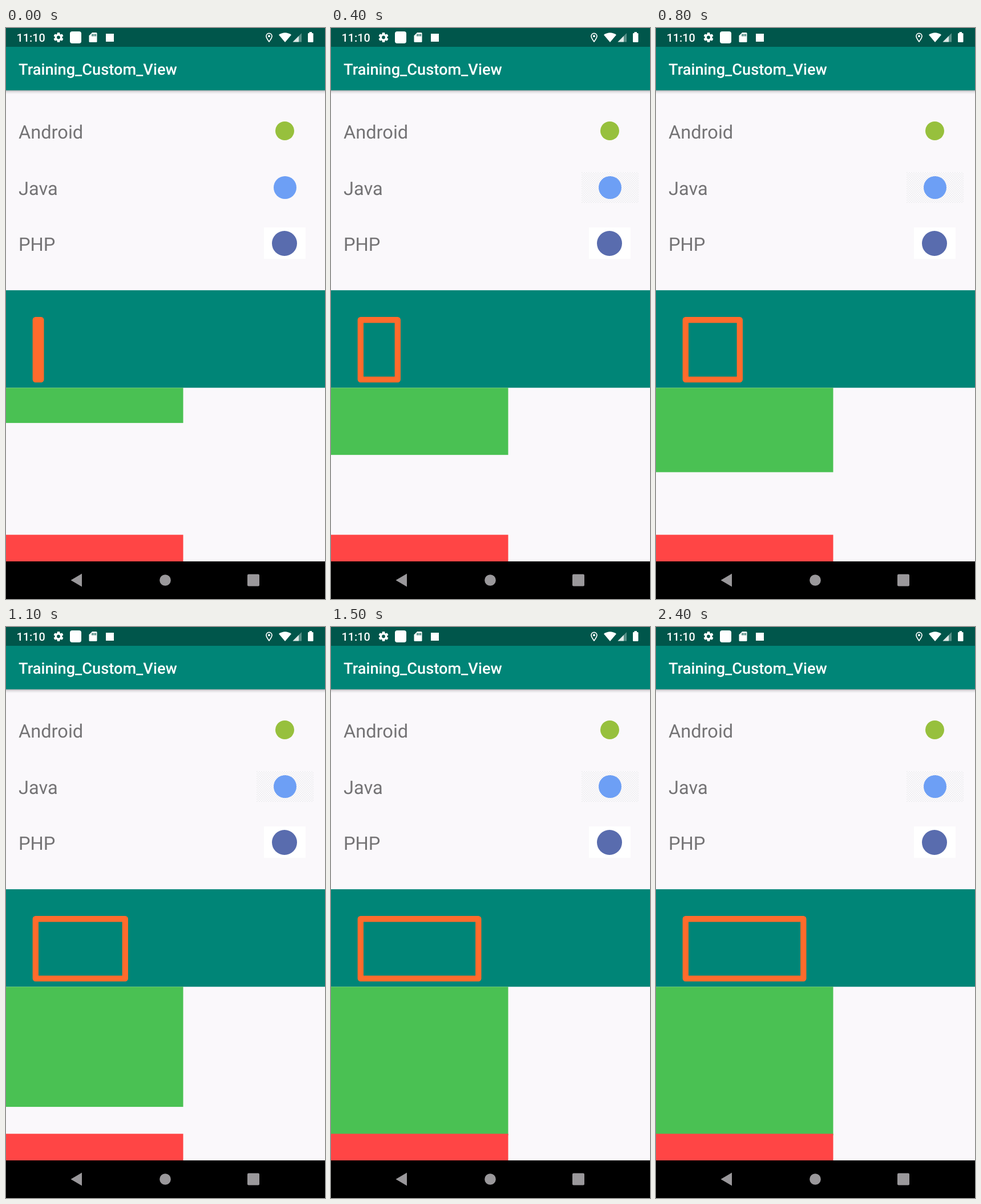
An HTML page with a canvas that plays this animation: 559 px wide and 1002 px high, repeating every 2.5 s.

```html
<!DOCTYPE html>
<html lang="en">
<head>
<meta charset="utf-8">
<title>Custom view</title>
<style>
html, body { margin: 0; width: 100%; height: 100%; overflow: hidden; background: #faf8fb; }
canvas { display: block; width: 559px; height: 1002px; }
</style>
</head>
<body>
<canvas id="stage" width="559" height="1002"></canvas>
<script>
const ctx = document.getElementById('stage').getContext('2d');
const LOOP = 2500, STEP = 100;
const TEAL = '#008577', PAPER = '#faf8fb', WHITE = '#fff';

// [time in ms, frame width in px]
const widths = [[0, 9.5], [400, 65], [800, 95], [1100, 157], [1300, 192], [1400, 206.5], [LOOP, 206.5]];

function widthAt(t) {
  const i = widths.findIndex(([time]) => time > t);
  const [t0, a] = widths[i - 1], [t1, b] = widths[i];
  return a + (b - a) * (t - t0) / (t1 - t0);
}

function rect(x, y, w, h, color) {
  ctx.fillStyle = color;
  ctx.fillRect(x, y, w, h);
}

function roundRect(x, y, w, h, r, color) {
  ctx.fillStyle = color;
  ctx.beginPath();
  ctx.roundRect(x, y, w, h, r);
  ctx.fill();
}

function circle(x, y, r, color) {
  ctx.fillStyle = color;
  ctx.beginPath();
  ctx.arc(x, y, r, 0, Math.PI * 2);
  ctx.fill();
}

function shape(d, color) {
  ctx.fillStyle = color;
  ctx.fill(new Path2D(d));
}

function text(str, x, y, size, weight, color) {
  ctx.font = `${weight} ${size}px Roboto, sans-serif`;
  ctx.textRendering = 'geometricPrecision';
  ctx.fillStyle = color;
  ctx.fillText(str, x, y);
}

function gear(x, y, hole) {
  ctx.save();
  ctx.translate(x, y);
  for (let i = 0; i < 6; i++) {
    roundRect(-2.3, -8.6, 4.6, 5, 0.8, WHITE);
    ctx.rotate(Math.PI / 3);
  }
  circle(0, 0, 6.4, WHITE);
  circle(0, 0, 2.9, hole);
  ctx.restore();
}

function statusBar() {
  const bar = '#00564b';
  rect(0, 0, 559, 33, bar);
  text('11:10', 18.5, 24, 19.8, 500, WHITE);
  gear(92, 16.5, bar);
  roundRect(112, 6, 20, 21, 4, WHITE);
  shape('M151 8H158Q159.500 8 159.500 9.500V23.500Q159.500 25 158 25H147Q145.500 25 145.500 23.500V13.500Z', WHITE);
  for (const x of [150.5, 153.4, 156.3]) rect(x, 10.5, 1.5, 4, bar);
  rect(175, 10, 14, 14, WHITE);

  ctx.strokeStyle = WHITE;
  ctx.lineWidth = 1.7;
  ctx.stroke(new Path2D('M461 24C458.500 20.500 456 17.500 456 14.300A5 5 0 0 1 466 14.300C466 17.500 463.500 20.500 461 24Z'));
  circle(461, 14.3, 2, WHITE);
  shape('M478 12Q489 4.500 500 12L489 25Z', WHITE);
  shape('M502.500 24.500L518 9V24.500Z', 'rgba(255,255,255,0.35)');
  shape('M502.500 24.500L513 14V24.500Z', 'rgba(255,255,255,0.8)');
  roundRect(529, 9, 9.5, 16, 1.2, WHITE);
  rect(531.5, 7, 4.5, 3, WHITE);
}

function appBar() {
  const shade = ctx.createLinearGradient(0, 109, 0, 116);
  shade.addColorStop(0, 'rgba(0,0,0,0.32)');
  shade.addColorStop(0.4, 'rgba(0,0,0,0.1)');
  shade.addColorStop(1, 'rgba(0,0,0,0)');
  rect(0, 109, 559, 7, shade);
  rect(0, 33, 559, 76.3, TEAL);
  text('Training_Custom_View', 22, 81.5, 27.2, 500, WHITE);
}

function checker(x, y, w, h, size, alpha) {
  ctx.save();
  ctx.globalAlpha = alpha;
  rect(x, y, w, h, '#fcfbfd');
  for (let r = 0; r * size < h; r++)
    for (let c = r % 2; c * size < w; c += 2)
      rect(x + c * size, y + r * size, size, size, '#f0eff2');
  ctx.restore();
}

function list(t) {
  const label = (s, y) => text(s, 22, y, 32.6, 400, '#747375');
  label('Android', 194);
  label('Java', 293);
  label('PHP', 391);
  circle(488.5, 180.5, 16.5, '#97c03d');
  checker(439, 253, 99, 53, 2, Math.min(1, t / 400));
  circle(489, 280, 20, '#6d9ff5');
  rect(452, 350, 73, 55, WHITE);
  circle(488, 378, 22, '#596cae');
}

function panels(t) {
  const w = widthAt(t);
  rect(0, 460.2, 559, 171.1, TEAL);
  ctx.strokeStyle = '#ff6b2c';
  ctx.lineWidth = 10.35;
  ctx.lineJoin = 'round';
  ctx.strokeRect(51.8, 512.2, w, 104.6);
  rect(0, 631.3, 310.5, 52.2 + w * 1.01, '#4ac153');
  rect(0, 889.3, 310.5, 46.7, '#ff4545');
}

function navBar() {
  const gray = '#9a989b';
  rect(0, 936, 559, 66, '#000');
  shape('M113.500 969L133 957.500V980.500Z', gray);
  circle(279, 969, 9.8, gray);
  roundRect(423, 958.5, 21, 21, 2, gray);
}

function draw(now) {
  const t = Math.floor((now % LOOP) / STEP) * STEP;
  rect(0, 0, 559, 1002, PAPER);
  statusBar();
  appBar();
  list(t);
  panels(t);
  navBar();
}

let start;
function tick(now) {
  start ??= now;
  draw(Math.max(0, now - start));
  requestAnimationFrame(tick);
}
draw(0);
requestAnimationFrame(tick);
</script>
</body>
</html>
```
